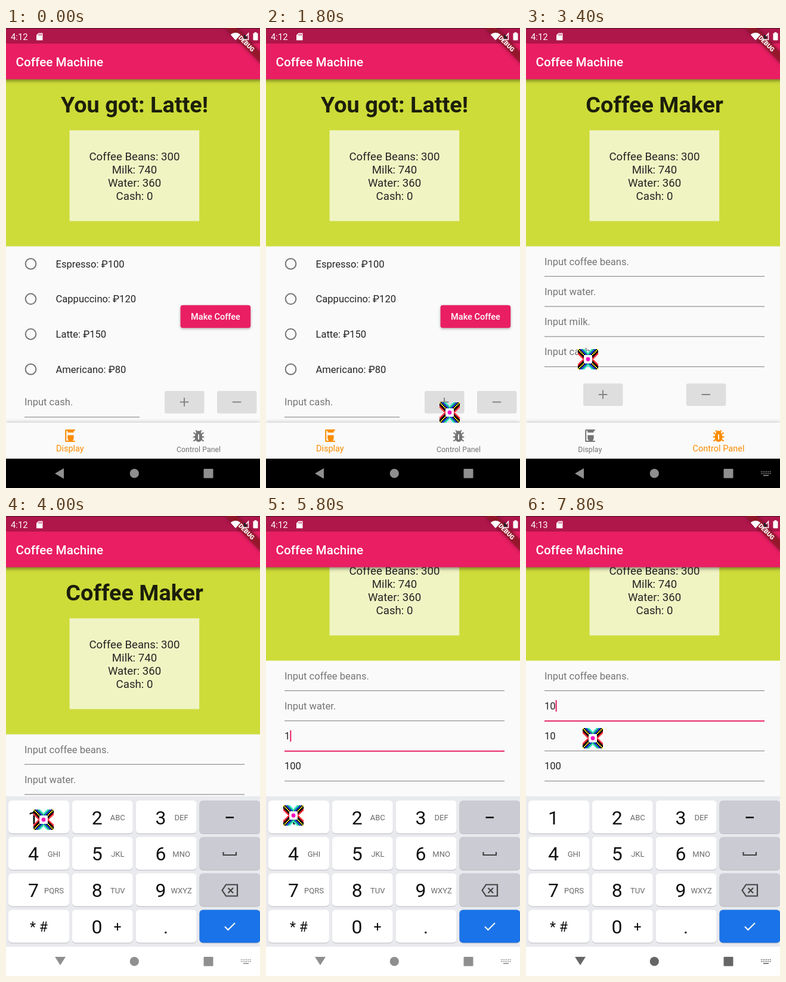
An HTML page with a canvas that plays this animation: 426x768 px, repeating every 8 s.

```html
<!DOCTYPE html>
<html lang="en">
<head>
<meta charset="utf-8">
<title>Coffee Machine</title>
<style>
html, body { margin: 0; width: 100%; height: 100%; overflow: hidden; background: #fafafa; }
canvas { display: block; width: 426px; height: 768px; }
</style>
</head>
<body>
<canvas id="stage" width="426" height="768"></canvas>
<script>
const ctx = document.getElementById('stage').getContext('2d');
const LOOP = 8000, STEP = 200, MID = 215.5;
const PINK = '#e91e63', INK = '#242424', GREY = '#757575', ORANGE = '#fb8c00';
const coffeeIcon = new Path2D('M18 6V4h2V2H6C4.9 2 4 2.9 4 4v16c0 1.1.9 2 2 2h14v-2h-4.03c1.22-.91 2.03-2.36 2.03-4v-5H8v5c0 1.64.81 3.09 2.03 4H6V4h2v2c0 .55.45 1 1 1h8c.55 0 1-.45 1-1z');

// Pointer path: time, x, y
const path = [
  [1400, 440, 575], [1800, 308, 642], [2000, 322, 686], [2200, 322, 688],
  [3200, 104, 553], [3400, 104, 553], [4000, 63, 507], [4200, 47, 504],
  [4600, 150, 676], [4800, 142, 659], [5000, 130, 560], [5400, 80, 368],
  [5800, 46, 500], [6200, 148, 680], [6400, 90, 330], [6600, 53, 489],
  [7000, 48, 504], [7400, 148, 682], [7800, 112, 371]
];

// Input rows of the panel: hint, focus start and end, caret start and end, times of key presses
const fields = [
  { hint: 'Input coffee beans.', focus: [9e9, 0], caret: [9e9, 0], value: '', keys: [] },
  { hint: 'Input water.', focus: [6800, LOOP], caret: [6600, LOOP], value: '10', keys: [7000, 7400] },
  { hint: 'Input milk.', focus: [5400, 6800], caret: [5400, 6600], value: '10', keys: [5800, 6200] },
  { hint: 'Input cash.', focus: [3600, 5400], caret: [3600, 5400], value: '100', keys: [4400, 4600, 4800] }
];

const within = (t, [a, b]) => t >= a && t < b;

function rect(x, y, w, h, color) {
  ctx.fillStyle = color;
  ctx.fillRect(x, y, w, h);
}

function round(x, y, w, h, r, color) {
  ctx.fillStyle = color;
  ctx.beginPath();
  ctx.roundRect(x, y, w, h, r);
  ctx.fill();
}

function disc(x, y, r, color) {
  ctx.fillStyle = color;
  ctx.beginPath();
  ctx.arc(x, y, r, 0, 7);
  ctx.fill();
}

function poly(points, color) {
  ctx.fillStyle = color;
  ctx.beginPath();
  points.forEach(([x, y]) => ctx.lineTo(x, y));
  ctx.closePath();
  ctx.fill();
}

function line(points, color, width) {
  ctx.strokeStyle = color;
  ctx.lineWidth = width;
  ctx.beginPath();
  points.forEach(([x, y], i) => i ? ctx.lineTo(x, y) : ctx.moveTo(x, y));
  ctx.stroke();
}

// y is the middle of the capitals
function text(str, x, y, size, color, align = 'left', weight = 400) {
  ctx.font = `${weight} ${size}px Roboto, sans-serif`;
  ctx.textAlign = align;
  ctx.fillStyle = color;
  ctx.fillText(str, x, y + size * 0.355);
}

function shadow(blur, dy, alpha, draw) {
  ctx.save();
  ctx.shadowColor = `rgba(0,0,0,${alpha})`;
  ctx.shadowBlur = blur;
  ctx.shadowOffsetY = dy;
  draw();
  ctx.restore();
}

function plusMinus(x1, x2, y) {
  for (const x of [x1, x2]) {
    round(x - 33, y - 18.5, 66.5, 37.5, 3, '#dedede');
    line([[x - 7.3, y], [x + 7.3, y]], '#858585', 2);
  }
  line([[x1, y - 7.3], [x1, y + 7.3]], '#858585', 2);
}

function header(title) {
  rect(0, 85, 426, 279.5, '#cddc39');
  text(title, MID, 128, 37.8, '#1c1e0c', 'center', 700);
  rect(106.6, 170.8, 217.6, 151.6, '#f0f4c3');
  ['Coffee Beans: 300', 'Milk: 740', 'Water: 360', 'Cash: 0'].forEach((s, i) =>
    text(s, MID, 214.5 + i * 22, 18.65, INK, 'center'));
}

function displayPage() {
  header('You got: Latte!');
  ['Espresso: ₽100', 'Cappuccino: ₽120', 'Latte: ₽150', 'Americano: ₽80'].forEach((s, i) => {
    const y = 393.7 + i * 58.7;
    ctx.strokeStyle = GREY;
    ctx.lineWidth = 2;
    ctx.beginPath();
    ctx.arc(41.5, y, 8.8, 0, 7);
    ctx.stroke();
    text(s, 83.5, y, 16.57, INK);
  });
  shadow(4, 1.5, 0.3, () => round(292.6, 462.8, 117.6, 38, 4, PINK));
  text('Make Coffee', 351.5, 482, 14.5, '#fff', 'center', 500);
  text('Input cash.', 31, 624.5, 16.57, GREY);
  rect(31, 649, 193, 1.2, '#8f8f8f');
  plusMinus(299, 387, 624.5);
}

function panelPage(t) {
  header('Coffee Maker');
  fields.forEach((f, i) => {
    const y = 389.7 + i * 50.3;
    const typed = f.value.slice(0, f.keys.filter(k => t >= k).length);
    text(typed || f.hint, 31, y, 16.57, typed ? INK : GREY);
    if (within(t, f.caret)) {
      const x = 31 + (typed ? ctx.measureText(typed).width : 0);
      rect(x, y - 9.5, 2, 19, PINK);
    }
    const on = within(t, f.focus);
    rect(31, y + 24.3, 369, on ? 2 : 1.2, on ? PINK : '#8f8f8f');
  });
  plusMinus(129, 301.8, 612);
}

function bugIcon(x, y, color) {
  for (const s of [-1, 1]) {
    line([[x + s * 4.8, y - 9.4], [x + s * 2, y - 6.2]], color, 2);
    line([[x + s * 8.6, y - 5.4], [x + s * 4, y - 2.6]], color, 2);
    line([[x + s * 9.3, y + 1.8], [x + s * 4, y + 1.8]], color, 2);
    line([[x + s * 8.6, y + 8.6], [x + s * 4, y + 5.6]], color, 2);
  }
  ctx.fillStyle = color;
  ctx.beginPath();
  ctx.ellipse(x, y + 2, 6.4, 8, 0, 0, 7);
  ctx.ellipse(x, y - 5.2, 4.2, 3.4, 0, 0, 7);
  ctx.fill();
  rect(x - 1, y - 2.5, 2, 8.5, '#fafafa');
}

function tabs(panel) {
  shadow(6, -1, 0.22, () => rect(0, 659, 426, 60, '#fafafa'));
  const tint = on => on ? ORANGE : GREY;
  ctx.save();
  ctx.translate(95, 668.3);
  ctx.scale(1.0355, 1.0355);
  ctx.fillStyle = tint(!panel);
  ctx.fill(coffeeIcon);
  ctx.restore();
  bugIcon(323, 681, tint(panel));
  const label = (s, x, on) => text(s, x, on ? 702 : 703.3, on ? 14.5 : 12.4, tint(on), 'center');
  label('Display', 107.3, !panel);
  label('Control Panel', 323, panel);
}

function keyboard(dy) {
  ctx.save();
  ctx.beginPath();
  ctx.rect(0, 85, 426, 634);
  ctx.clip();
  ctx.translate(0, dy);
  rect(0, 468, 426, 260, '#e9eaee');
  const letters = ['', 'ABC', 'DEF', 'GHI', 'JKL', 'MNO', 'PQRS', 'TUV', 'WXYZ'];
  for (let r = 0; r < 4; r++) {
    for (let c = 0; c < 4; c++) {
      const x = 4 + c * 106.8, y = 475 + r * 60.8;
      const color = c < 3 ? '#fff' : r < 3 ? '#cacbd3' : '#1a73e8';
      round(x, y + 1, 102, 55, 6, '#b9bac0');
      round(x, y, 102, 55, 6, color);
      if (c < 3 && r < 3) {
        const n = r * 3 + c;
        text(n + 1, x + 42, y + 28.3, 32, '#111', 'center');
        text(letters[n], x + 76.5, y + 28.3, 13, '#6a6a6a', 'center');
      }
    }
  }
  text('* #', 55, 686, 23, '#111', 'center');
  text('0', 152.5, 686, 32, '#111', 'center');
  text('+', 187, 686, 23, '#111', 'center');
  text('.', 268, 686, 30, '#111', 'center');
  rect(368.5, 502, 13.5, 2.6, '#111');
  line([[364.5, 561], [364.5, 566], [386, 566], [386, 561]], '#444', 2.2);
  line([[362.5, 625], [369, 615.5], [388, 615.5], [388, 634.5], [369, 634.5], [362.5, 625], [363, 624]], '#444', 2.2);
  line([[372.5, 621], [381, 629.5]], '#444', 2.2);
  line([[381, 621], [372.5, 629.5]], '#444', 2.2);
  line([[367, 685.5], [372.5, 691], [384, 679.5]], '#fff', 2);
  ctx.restore();
}

function navBar(t) {
  const light = t >= 3600;
  const color = t >= 7800 ? '#666' : '#8f8f8f';
  rect(0, 719, 426, 49, light ? '#fff' : '#000');
  poly(light ? [[82, 736], [100, 736], [91, 750]] : [[82, 743.7], [97, 735], [97, 752.4]], color);
  disc(215.3, 743.7, 7.6, color);
  round(331.5, 736, 16, 15.5, 1, color);
  if (t >= 3400) {
    for (let i = 0; i < 6; i++)
      for (let j = 0; j < 2; j++) rect(394 + i * 3, 740 + j * 3, 1.6, 1.6, color);
    rect(398, 746.3, 9, 1.6, color);
  }
}

function ribbon() {
  ctx.save();
  ctx.translate(428, 1.5);
  ctx.rotate(Math.PI / 4);
  shadow(6, 0, 0.5, () => rect(-42, 28.5, 84, 12.5, 'rgba(151,25,42,0.88)'));
  text('DEBUG', 0, 34.8, 10.3, '#fff', 'center', 900);
  ctx.restore();
}

function statusIcons() {
  poly([[54.5, 8.5], [61.5, 8.5], [61.5, 20.5], [51, 20.5], [51, 12]], '#fff');
  for (let i = 0; i < 3; i++) rect(54.5 + i * 2.2, 10, 1.1, 2.6, '#af164a');
  // Wi-Fi, signal and battery
  ctx.fillStyle = '#fff';
  ctx.beginPath();
  ctx.moveTo(385, 20.5);
  ctx.lineTo(376.6, 11);
  ctx.quadraticCurveTo(385, 4.5, 393.4, 11);
  ctx.fill();
  line([[397.5, 19.5], [406.5, 19.5], [406.5, 9], [397.5, 19.5]], '#fff', 1.5);
  poly([[399, 10], [399, 19], [405, 16]], '#222');
  round(414.5, 8.5, 8, 12, 1, '#fff');
  rect(416.8, 7, 3.4, 2, '#fff');
}

function appBar(t) {
  shadow(6, 2, 0.45, () => rect(-10, 26, 446, 59.5, PINK));
  rect(0, 0, 426, 26, '#af164a');
  rect(0, 0, 426, 1, '#4a1024');
  text('Coffee Machine', 16.5, 57, 20.7, '#fff', 'left', 500);
  text(t < 6400 ? '4:12' : '4:13', 8, 15, 14.8, '#fff');
  ribbon();
  statusIcons();
}

function pointerAt(t) {
  if (t < path[0][0]) return null;
  const i = path.findIndex(p => p[0] >= t);
  if (i === 0) return path[0].slice(1);
  const a = path[i - 1], b = path[i], k = (t - a[0]) / (b[0] - a[0]);
  return [1, 2].map(n => a[n] + (b[n] - a[n]) * k);
}

// Mirrored bands of colour along both diagonals around a white heart
function pointer(t) {
  const at = pointerAt(t);
  if (!at) return;
  const [px, py] = at.map(Math.round);
  const side = ['#ffee2a', '#000', '#000', '#d8152c', '#ff4a50'];
  const cap = ['#ffee2a', '#000', '#1746d1', '#1746d1', '#32e55c', '#35dff0'];
  for (let u = -8; u <= 8; u++) {
    for (let v = -8; v <= 8; v++) {
      const a = Math.abs(u), b = Math.abs(v), d = a - b;
      const color = Math.max(a, b) < 4 ? '#fff' : d >= 0 ? side[d] : cap[-d];
      if (color) rect(px + u * 2 - 1, py + v * 2 - 1, 2, 2, color);
    }
  }
  disc(px, py, 3.4, '#f012be');
}

function draw(t) {
  const panel = t >= 2200;
  rect(0, 0, 426, 768, '#fafafa');
  ctx.save();
  ctx.translate(0, t >= 4200 ? -123 : 0);
  if (panel) panelPage(t);
  else displayPage();
  ctx.restore();
  if (t < 3800) tabs(panel);
  if (t >= 3600) keyboard(t < 3800 ? 110 : 0);
  navBar(t);
  appBar(t);
  pointer(t);
}

function tick(now) {
  draw(Math.floor(now % LOOP / STEP) * STEP);
  requestAnimationFrame(tick);
}
requestAnimationFrame(tick);
</script>
</body>
</html>
```
